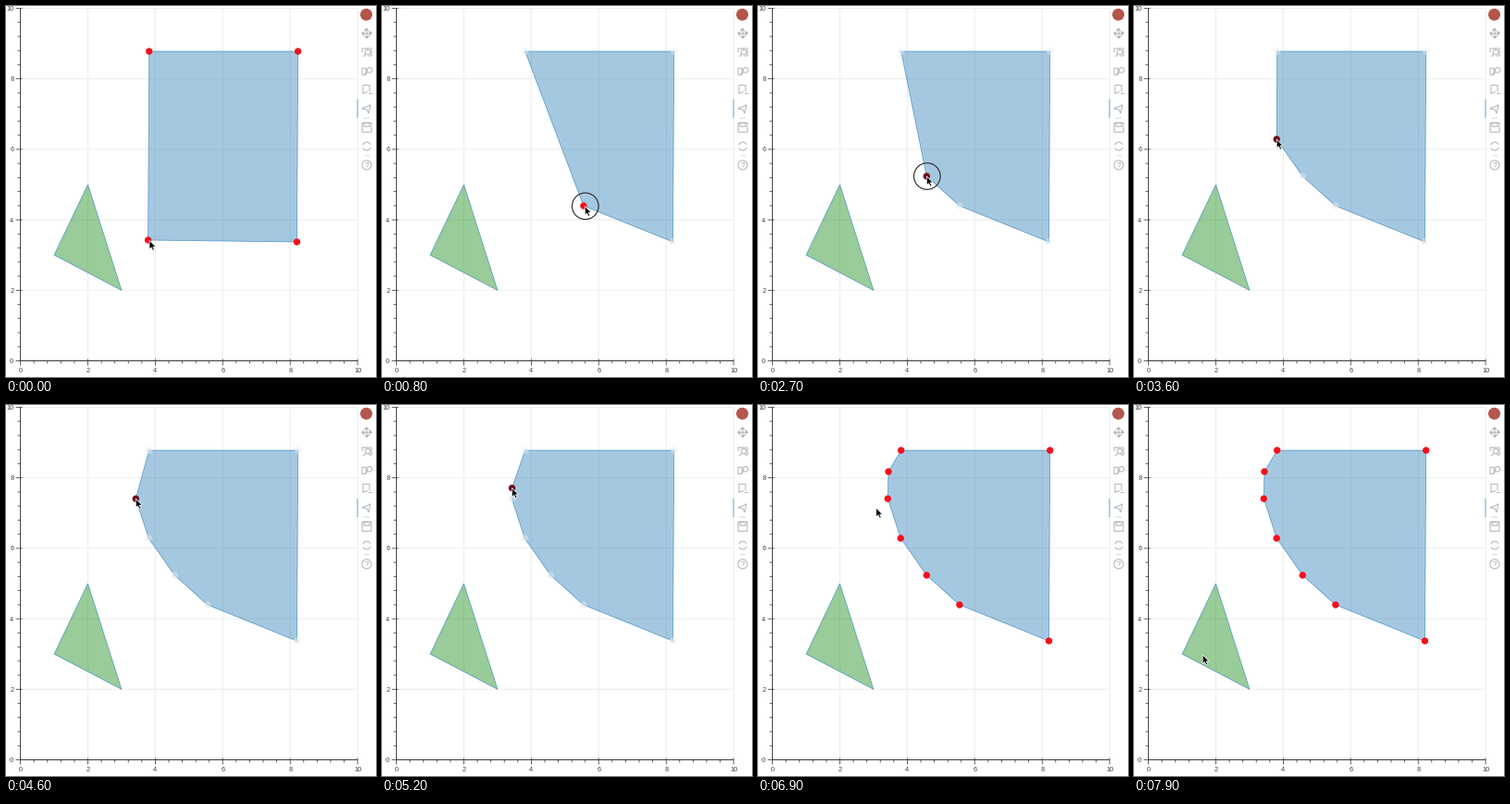
A matplotlib script for the animation above (8 s loop, 400 by 401 pixels).

```python
import numpy as np
import matplotlib.pyplot as plt
from matplotlib.animation import FuncAnimation
from matplotlib.patches import Circle, Polygon

W, H, DPI = 400, 401, 64
PX = 72 / DPI
FRAMES, STEP = 80, 100
BLUE, RED, AXIS, ICON = "#1f77b4", "#f5101c", "#3c3c3c", "#aeb3b6"

fig = plt.figure(figsize=(W / DPI, H / DPI), dpi=DPI, facecolor="white")
ax = fig.add_axes([0, 0, 1, 1])
ax.set_xlim(0, W)
ax.set_ylim(H, 0)
ax.axis("off")


def px(v):
    return 15.6 + 36.45 * v


def py(v):
    return 383.5 - 38.1 * v


def line(xs, ys, color=AXIS, width=1, z=1):
    ax.plot(xs, ys, color=color, lw=width * PX, zorder=z, snap=False,
            solid_capstyle="butt")


def ring(x, y, r, color=ICON, width=1):
    return ax.add_patch(Circle((x, y), r, fill=False, ec=color,
                               lw=width * PX, zorder=7))


def area(points, fill):
    body = Polygon(points, fc=fill, alpha=0.4, lw=0, zorder=3)
    edge = Polygon(points, fill=False, ec=BLUE, lw=0.8 * PX, alpha=0.65,
                   zorder=4, snap=False)
    return ax.add_patch(body), ax.add_patch(edge)


def label(x, y, text, size, **kw):
    ax.text(x, y, text, family="Liberation Sans", size=size * PX,
            va="center_baseline", **kw)


def draw_axes():
    x0, x1, y0, y1 = px(0), px(10), py(0), py(10)
    for i in range(26):
        v, major = 0.4 * i, i % 5 == 0
        inner, outer = (2, 5) if major else (0, 3)
        line([px(v)] * 2, [y0 - inner, y0 + outer], width=0.8)
        line([x0 - outer, x0 + inner], [py(v)] * 2, width=0.8)
        if major:
            line([px(v)] * 2, [y0, y1], "#ededed", z=0)
            line([x0, x1], [py(v)] * 2, "#ededed", z=0)
            label(px(v), 393.8, f"{v:.0f}", 7.4, ha="center", color="#444444")
            label(8.3, py(v), f"{v:.0f}", 7.4, ha="right", color="#444444")
    line([x0, x1], [y0, y0])
    line([x0, x0], [y0, y1])


def slot(i):
    return 9.3 + 20.33 * i


def stroke(i, *points):
    xs, ys = np.transpose(points)
    line(390 + xs, slot(i) + ys, ICON, 1)


def box(i, x, y, w, h):
    stroke(i, (x, y), (x + w, y), (x + w, y + h), (x, y + h), (x, y))


def magnifier(i, x, y):
    ring(390 + x, slot(i) + y, 2.8)
    stroke(i, (x - 2, y + 2), (x - 5, y + 5))


def draw_toolbar():
    ax.add_patch(Circle((389.5, slot(0)), 6.5, fc="#b4564c", lw=0))
    # pan: one arrow turned four ways
    arm = np.array([(0, 0), (5, 0), (3, -2), (5, 0), (3, 2)])
    for _ in range(4):
        stroke(1, *arm)
        arm = arm @ [[0, 1], [-1, 0]]
    # box zoom and wheel zoom
    stroke(2, (-5, 0), (-5, -4), (5, -4), (5, 4), (2, 4))
    magnifier(2, 1, 0)
    box(3, -5, -3, 4, 7)
    magnifier(3, 3, -1)
    # polygon draw and edit
    stroke(4, (3, 2), (3, -5), (-4, -5), (-4, 4), (1, 2))
    stroke(4, (2, 4), (6, 4))
    stroke(5, (-5, 0), (4, -4), (2, 5), (0, 1), (-5, 0))
    # save
    box(6, -5, -5, 10, 10)
    box(6, -3, -5, 6, 4)
    # reset: two arcs
    for start in (0.3, 0.3 + np.pi):
        a = np.linspace(start, start + 2.4, 16)
        stroke(7, *np.transpose([4.4 * np.cos(a), 4.4 * np.sin(a)]))
    # help
    ring(390, slot(8), 5)
    label(390, slot(8), "?", 8, ha="center", color=ICON, weight="bold")
    for i in (5.5, 7.5):
        line([386.5, 393], [slot(i)] * 2, "#d5d8da")
    line([380, 380], [slot(5) - 10, slot(5) + 10], "#8cbccf", 1.3, z=2)


draw_axes()
draw_toolbar()
area([(px(1), py(3)), (px(2), py(5)), (px(3), py(2))], "green")

CORNERS = [(154.7, 49), (315.7, 49), (314.5, 255)]
# pointer stops: grab, drop, four clicks, exit
STOPS = np.array([(155, 253.3), (219.3, 216.3), (182.3, 184), (154.2, 144),
                  (140.3, 101.3), (141, 72), (74.2, 270)])
GRIP = np.array((1.4, 0.3))
MOVE, BEAT = 700, 1000
PICK, DRAW, DONE, LEAVE = 100, 1700, 6300, 6700
STARTS = [PICK] + [DRAW + 200 + BEAT * k for k in range(4)] + [LEAVE]

body, edge = area(CORNERS, BLUE)
dots = ax.scatter([], [], s=(7.4 * PX) ** 2, lw=0, zorder=5)
press = ring(0, 0, 14.3, "#333333", 1.2)
ARROW = 0.92 * np.array([(0, 0), (0, 10.5), (2.4, 8.3), (4.1, 12),
                         (5.9, 11.2), (4.3, 7.6), (7.4, 7.4)])
arrow = ax.add_patch(Polygon(ARROW, fc="black", ec="white", lw=0.7 * PX,
                             zorder=9))


def pointer(t):
    u = np.clip((t - np.array(STARTS)) / MOVE, 0, 1)
    return STOPS[0] + (u * u * (3 - 2 * u)) @ np.diff(STOPS, axis=0)


def update(i):
    t = i * STEP
    pos = pointer(t)
    beat, rest = divmod(t - DRAW, BEAT)

    # the dragged corner keeps its grip; drawn ones sit under the pointer
    points = CORNERS + [pos - GRIP]
    if t >= DRAW:
        placed = min(beat, 4)
        tip = STOPS[5] if t >= DONE else pos
        points = CORNERS + [STOPS[1] - GRIP, *STOPS[2:2 + placed]]
        if placed < 4:
            points.append(tip)
    for patch in (body, edge):
        patch.set_xy(points)

    colors = [RED] * len(points)
    if PICK < t < DONE:
        colors = [(0.9, 0.92, 0.94, 0.5)] * len(points)
        colors[-1] = "#6e1019" if t >= DRAW else RED
    dots.set_offsets(points)
    dots.set_facecolors(colors)

    dragging = PICK < t <= PICK + MOVE
    press.set_visible(dragging or (DRAW <= t < DONE and rest == 0))
    press.center = pos + (0.5, 0)
    arrow.set_xy(ARROW + pos)
    return body, edge, dots, press, arrow


anim = FuncAnimation(fig, update, frames=FRAMES, interval=STEP, repeat=True,
                     repeat_delay=0)
plt.show()
```
